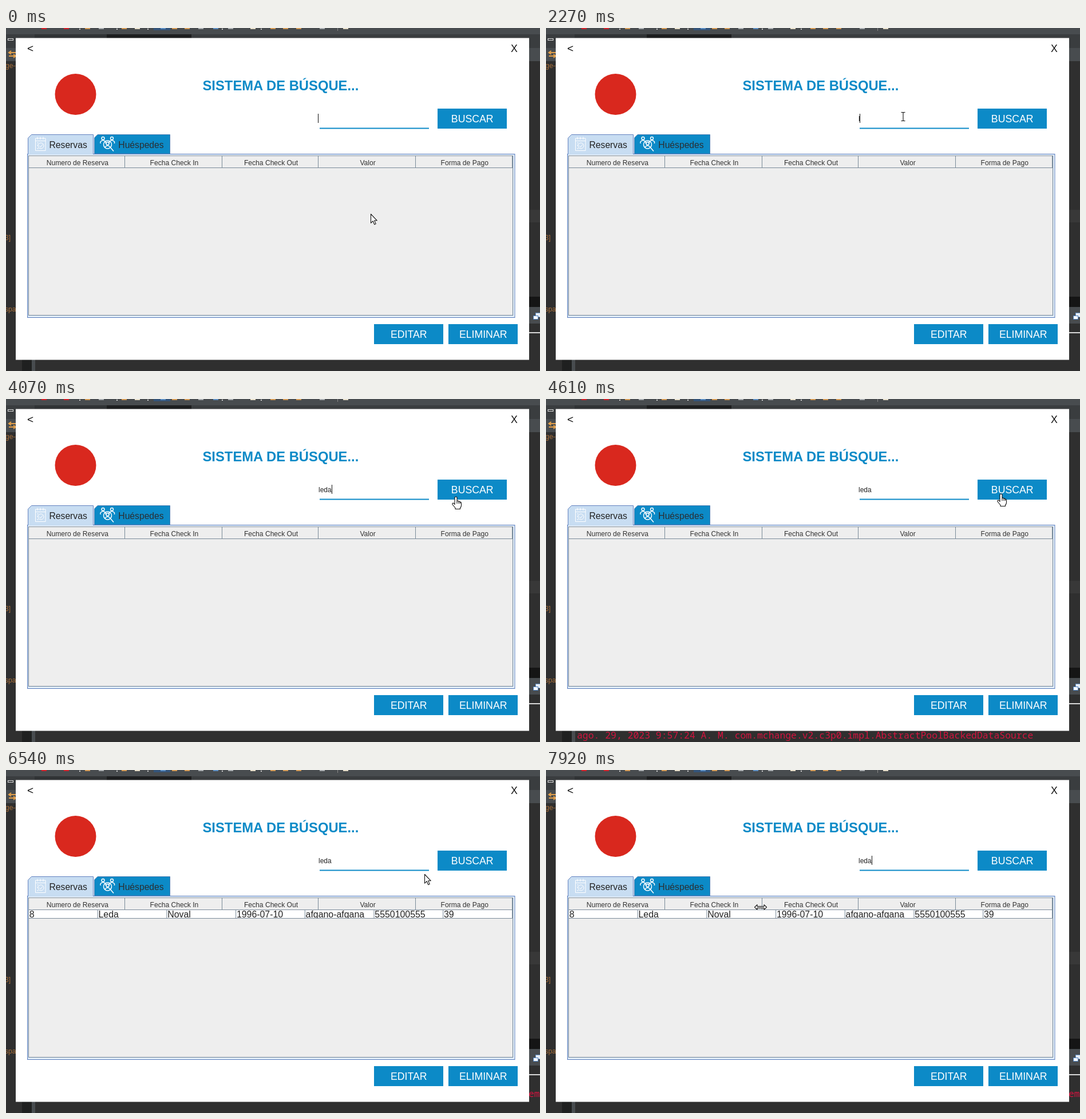
An HTML page that plays this animation: 933 by 600 pixels, repeating every 7.99 s.

```html
<!DOCTYPE html>
<html lang="es">
<head>
<meta charset="utf-8">
<title>Sistema de búsqueda</title>
<style>
html, body { margin: 0; width: 100%; height: 100%; overflow: hidden; background: #2f2f2f; }
svg { display: block; width: 100vw; height: 100vh; }
text { font-family: "Liberation Sans", Arial, sans-serif; white-space: pre; }
.mono { font-family: "Noto Sans Mono", "DejaVu Sans Mono", monospace; font-size: 16.42px; fill: #d3143f; }
.code { font-size: 12px; fill: #a8703a; }
</style>
</head>
<body>
<svg id="stage" viewBox="0 0 933 600" preserveAspectRatio="none">
  <g id="ide"></g>
  <text id="log" class="mono" x="54" y="594">ago. 29, 2023 9:57:24 A. M. com.mchange.v2.c3p0.impl.AbstractPoolBackedDataSource</text>
  <text id="logTail" class="mono" x="913" y="572">eme</text>
  <rect x="17" y="17.5" width="897" height="563" fill="#fff"/>
  <circle cx="121.5" cy="116" r="36" fill="#d9281e"/>
  <g id="form"></g>
  <g id="tabs"></g>
  <g id="table"></g>
  <g id="row"></g>
  <text id="query" x="546" y="162.5" font-size="12" fill="#222"></text>
  <rect id="caret" y="150" width="1" height="16" fill="#111"/>
  <g id="pointer" stroke="#111" stroke-width="1.1" stroke-linejoin="round" fill="#fff">
    <path id="arrow" d="M.5.5V16.2L4.2 12.7 6.8 18.7 9.2 17.6 6.7 11.8H11.3Z"/>
    <path id="beam" fill="none" d="M-3.5-7.5H-1L0-6.8 1-7.5H3.5M0-6.8V6.8M-3.5 7.5H-1L0 6.8 1 7.5H3.5"/>
    <path id="hand" d="M-2 2Q-2 0 0 0T2 2V7.5Q4.500 6.500 5 8.500 7 7.500 7.500 9.500 9.500 9 9.500 11V15Q9.500 18 7.500 19.500V21.500H-1V19.500L-6 13.500Q-6.500 11-4.500 11-3 11.500-2 13.500ZM-2 13.5V2M2 7.5V12M5 8.5V12M7.500 9.500V12"/>
    <path id="resize" d="M-10.5 0L-6-4.3V-1.4H6V-4.3L10.5 0 6 4.3V1.4H-6V4.3Z"/>
  </g>
</svg>
<script>
const LOOP = 7990, BLUE = "#0c8ac7", EDGE = "#6382bf", GREY = "#7a8a99", PALE = "#c8ddf2";
const $ = id => document.getElementById(id);

const add = (parent, tag, attrs, text = "") => {
  const el = document.createElementNS("http://www.w3.org/2000/svg", tag);
  for (const key in attrs) el.setAttribute(key, attrs[key]);
  el.textContent = text;
  $(parent).append(el);
  return el;
};
const rect = (parent, x, y, width, height, fill, stroke = "none") =>
  add(parent, "rect", { x, y, width, height, fill, stroke });
const path = (parent, d, stroke, fill = "none", width = 1) =>
  add(parent, "path", { d, stroke, fill, "stroke-width": width });
const label = (parent, x, y, size, text, fill = "#222", anchor = "start") =>
  add(parent, "text", { x, y, "font-size": size, fill, "text-anchor": anchor }, text);

function buildIde() {
  const box = (...args) => rect("ide", ...args);
  box(0, 0, 933, 600, "#2f2f2f");
  box(0, 0, 933, 11, "#484c4f");
  box(0, 11, 933, 24, "#3a3d3f");
  box(50, 11, 126, 7, "#303335");
  box(176, 11, 148, 7, "#1d1e1f");
  box(0, 35, 17, 23, "#484c4f");
  box(914, 35, 19, 23, "#484c4f");
  box(914, 318, 19, 22, "#383838");
  box(914, 470, 19, 18, "#151515");
  box(914, 488, 19, 29, "#484c4f");
  box(914, 532, 19, 2, "#d8d8d8");
  box(28, 580, 17, 20, "#1f2020");
  box(45, 580, 6, 20, "#484c4f");
  box(258, 0, 29, 4, "#34547a");

  const icons = { "#d3202a": [62, 101], "#d49a55": [138, 202, 290, 312, 462, 484, 507],
    "#a9adb0": [162, 336, 388, 548], "#e8dfca": [225, 427, 589], "#5d8fc4": [270, 362] };
  for (const color in icons) icons[color].forEach(x => box(x, 0, 9, 2, color));
  [128, 193, 247, 377, 445].forEach(x => box(x, 1, 2, 2, "#ccc"));
  box(579, 0, 1, 5, "#888");
  box(3.5, 18.5, 9, 3, "none", "#ddd");
  path("ide", "M17 43H6M9 40L5 43 9 46M5 49H16M13 46L17 49 13 52", "#e4a04a", "none", 2);
  box(925.5, 498.5, 9, 7, "#e8eef5", "#6d9bd0");
  box(921.5, 503.5, 8, 6, "#fff", "#4d7fbd");
  [[-1, 70, "ge-c"], [-2, 371, "3]"], [-2, 496, "spac"]].forEach(([x, y, text]) =>
    add("ide", "text", { x, y, class: "code" }, text));
}

function buildForm() {
  label("form", 37, 42, 19, "<", "#111");
  label("form", 882, 42, 17.7, "X", "#111");
  const title = label("form", 343.5, 108.5, 23.8, "SISTEMA DE BÚSQUE...", BLUE);
  title.setAttribute("font-weight", "bold");
  rect("form", 548, 174.5, 191, 2, BLUE);
  [[754, 141, "BUSCAR"], [643, 518, "EDITAR"], [773, 518, "ELIMINAR"]].forEach(([x, y, text]) => {
    rect("form", x, y, 121, 35, BLUE);
    label("form", x + 60.7, y + 23.7, 17.7, text, "#fff", "middle");
  });
}

function buildTabs() {
  path("tabs", "M154.5 220V192L160 186.5H286.5V220Z", "#4a7fb5", BLUE);
  path("tabs", "M38.5 221V192.5L44.5 186.5H152.5V221Z", EDGE, PALE);
  label("tabs", 75.5, 210, 15.7, "Reservas");
  label("tabs", 196.3, 210, 15.7, "Huéspedes", "#2b2f33");
  // calendar with a check mark
  path("tabs", "M51.5 193H69V214.5H51.5ZM51.5 197.5H69M55 190.5V195M60 190.5V195M65 190.5V195M54 201H57M54 205H56M54 211H57", "#fff");
  path("tabs", "M56 206A5 5 0 1 0 66 206A5 5 0 1 0 56 206M58.5 206L60.5 208.5 64 203.5", "#fff");
  // people under a magnifier
  path("tabs", "M170.5 204A7 7 0 1 0 184.5 204A7 7 0 1 0 170.5 204M182.5 209L188 215.5M175 202A2.5 2.5 0 1 0 180 202A2.5 2.5 0 1 0 175 202M173 208.5Q177.5 203 182 208.5", "#fff", "none", 1.5);
  [169.5, 185].forEach(x =>
    path("tabs", `M${x - 2.5} 193a2.5 2.5 0 1 0 5 0a2.5 2.5 0 1 0-5 0M${x - 4.5} 202V199Q${x} 194 ${x + 4.5} 199V202`, "#fff", "none", 1.4));
}

const DIVIDERS = [207.5, 377.5, 545.5, 715.5];

function buildTable() {
  rect("table", 37.5, 220.5, 851.5, 286, PALE, EDGE);
  rect("table", 39.5, 223.5, 846, 279, "#eee", GREY);
  path("table", "M39 222.5H887M887.5 223V504.5H39", "#fff");
  path("table", "M40 244.5H885M884.5 224V245", GREY);
  path("table", "M39 220.5H152", PALE);
  DIVIDERS.forEach(x => path("table", `M${x} 224V244`, GREY));
  ["Numero de Reserva", "Fecha Check In", "Fecha Check Out", "Valor", "Forma de Pago"]
    .forEach((text, i) => label("table", 124.8 + i * 169.1, 239.5, 12.1, text, "#333", "middle"));

  rect("row", 40, 245, 844.5, 15, "#fff");
  ["8", "Leda", "Noval", "1996-07-10", "afgano-afgana", "5550100555", "39"].forEach((text, i) => {
    const x = 39.5 + i * 120.7;
    label("row", x + 1.3, 258, 15.9, text);
    if (i) path("row", `M${x} 245V260`, GREY);
  });
  rect("row", 40, 260, 844.5, 4, "#eee");
  path("row", "M40 259.5H884.5V245", GREY);
}

// Each move redraws the pointer every `step` ms along timed points [ms, x, y].
const MOVES = [
  { from: 600, step: 67, points: [[533, 637, 325], [800, 628, 240], [1002, 617, 184], [1270, 609, 162]] },
  { from: 1470, step: 60, points: [[1410, 609, 162], [1530, 624, 155]] },
  { from: 3510, step: 70, points: [[3440, 624, 155], [3510, 660, 160], [3850, 740, 172], [4050, 785, 172], [4210, 795, 166]] },
  { from: 6330, step: 68, points: [[6262, 795, 166], [6500, 745, 180], [6800, 625, 202], [7010, 581, 207]] },
  { from: 7140, step: 70.9, points: [[7069, 581, 207], [7140, 573, 208], [7400, 505, 224], [7700, 412, 233], [7920, 375, 240]] },
];

function along(points, t) {
  const next = points.findIndex(p => p[0] > t);
  if (next < 0) return points[points.length - 1].slice(1);
  const a = points[Math.max(next - 1, 0)], b = points[next];
  const u = Math.max(0, (t - a[0]) / (b[0] - a[0]));
  return [a[1] + (b[1] - a[1]) * u, a[2] + (b[2] - a[2]) * u];
}

function pointerAt(t) {
  const move = MOVES.filter(m => t >= m.from).pop();
  if (!move) return MOVES[0].points[0].slice(1);
  const tick = Math.floor((t - move.from) / move.step + 0.1);
  return along(move.points, move.from + tick * move.step);
}

function pointerKind(x, y) {
  if (y > 141 && y < 176) {
    if (x > 545 && x < 739) return "beam";
    if (x > 754 && x < 875) return "hand";
  }
  const onDivider = y > 224 && y < 245 && DIVIDERS.some(d => Math.abs(d - x) < 4);
  return onDivider ? "resize" : "arrow";
}

const KEYS = [2270, 2400, 2600, 2670];
const CARET_X = [545, 548, 555, 562, 569];
const BLINKS = [270, 800, 1270, 1800, 3180, 3710, 4210, 4730, 5200, 5730, 6190, 6740, 7210, 7740];
const show = (id, on) => $(id).setAttribute("visibility", on ? "visible" : "hidden");
const count = (times, t) => times.filter(time => t >= time).length;

function render(t) {
  const typed = count(KEYS, t);
  $("query").textContent = "leda".slice(0, typed);
  $("caret").setAttribute("x", CARET_X[typed]);
  show("caret", count(BLINKS, t) % 2 === 0);
  show("log", t >= 4530 && t < 4670);
  show("logTail", t >= 4670);
  show("row", t >= 4670);

  const [x, y] = pointerAt(t).map(Math.round);
  const kind = pointerKind(x, y);
  $("pointer").setAttribute("transform", `translate(${x} ${y})`);
  ["arrow", "beam", "hand", "resize"].forEach(id => show(id, id === kind));
}

buildIde();
buildForm();
buildTabs();
buildTable();

const start = performance.now();
function frame() {
  render((performance.now() - start) % LOOP);
  requestAnimationFrame(frame);
}
render(0);
requestAnimationFrame(frame);
</script>
</body>
</html>
```
